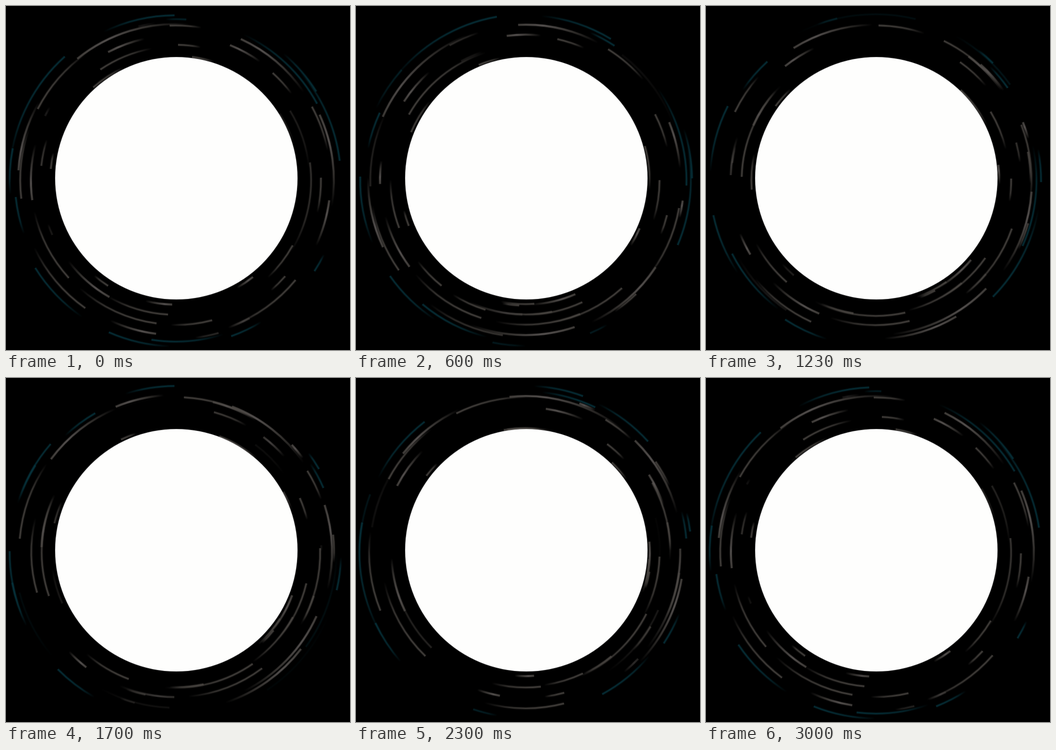
Write an HTML page with a canvas that moves like this. It is 720 px wide and 720 px high and loops after 3030 ms.

```html
<!DOCTYPE html>
<html lang="en">
<head>
<meta charset="utf-8">
<title>Orbiting light streaks</title>
<style>
  html, body { margin: 0; width: 100%; height: 100%; overflow: hidden; background: #000; }
  canvas { display: block; }
</style>
</head>
<body>
<canvas id="stage" width="720" height="720"></canvas>
<script>
const ctx = document.getElementById('stage').getContext('2d');
const LOOP = 3.03, STEPS = 91, TAU = 2 * Math.PI, RAD = Math.PI / 180;
const CX = 355, CY = 365;
const GRAY = '76,72,68', PALE = '104,99,97', TEAL = '6,52,62';

let seed = 29;
const random = () => (seed = (seed * 16807) % 2147483647) / 2147483647;
const between = (a, b) => a + (b - a) * random();

const streaks = [];

// Spread streaks around one ring; dir is -1 for counterclockwise, 1 for clockwise.
function addRing(radius, spread, count, dir, speed) {
  for (let i = 0; i < count; i++) {
    const phase = random();
    const rate = speed + between(-4, 4);
    const head = (i + between(-0.35, 0.35)) * 360 / count;
    streaks.push({
      dir,
      r: radius + between(-spread, spread),
      start: head - dir * rate * LOOP * phase,
      travel: dir * rate * LOOP,
      length: 6 + 38 * Math.pow(random(), 1.2),
      rgb: dir > 0 ? TEAL : GRAY,
      pale: dir < 0 && random() < 0.3,
      phase
    });
  }
}

for (let ring = 0; ring < 4; ring++) addRing(260.5 + 21.7 * ring, 2, 8 + ring, -1, 46);
addRing(330, 2, 4, -1, 46);
addRing(347, 1.5, 9, 1, 42);
addRing(338, 2, 4, 1, 42);

const clamp = x => Math.max(0, Math.min(1, x));

function drawStreak(s, t) {
  const age = (t / LOOP + s.phase) % 1;
  const alpha = clamp(age * 10) * clamp((1 - age) * 8);
  const sway = s.dir > 0 ? 7 * Math.sin(TAU * t / LOOP) : 0;
  const head = (s.start + s.travel * age + sway) * RAD;
  const span = Math.min(s.length, Math.abs(s.travel) * age) * RAD;
  if (alpha * span < 0.002) return;

  // The trail fades from the leading tip backwards.
  const from = s.dir > 0 ? head - span : head;
  const pad = 0.01;
  const fill = ctx.createConicGradient(from - pad, CX, CY);
  const stop = (pos, rgb, a) => {
    const along = s.dir > 0 ? 1 - pos : pos;
    fill.addColorStop((along * span + pad) / TAU, `rgba(${rgb},${a * alpha})`);
  };
  stop(0, s.rgb, 1);
  stop(0.3, s.pale ? PALE : s.rgb, 0.95);
  stop(0.65, s.rgb, 0.75);
  stop(1, s.rgb, 0);

  ctx.strokeStyle = fill;
  ctx.beginPath();
  ctx.arc(CX, CY, s.r, from, from + span);
  ctx.globalAlpha = 0.25;
  ctx.lineWidth = 6;
  ctx.stroke();
  ctx.globalAlpha = 0.75;
  ctx.lineWidth = s.pale ? 3.6 : 3;
  ctx.stroke();
  ctx.globalAlpha = 1;
}

function drawDisc() {
  ctx.fillStyle = '#fefefd';
  ctx.strokeStyle = 'rgba(254,254,253,0.2)';
  ctx.lineWidth = 2;
  ctx.beginPath();
  ctx.arc(356.5, 360.5, 253.5, 0, TAU);
  ctx.fill();
  ctx.stroke();
}

function draw(seconds) {
  const step = Math.floor(((seconds + 0.004) % LOOP) / LOOP * STEPS);
  const t = step / STEPS * LOOP;
  ctx.globalCompositeOperation = 'source-over';
  ctx.fillStyle = '#000';
  ctx.fillRect(0, 0, 720, 720);
  ctx.globalCompositeOperation = 'lighten';
  for (const s of streaks) drawStreak(s, t);
  ctx.globalCompositeOperation = 'source-over';
  drawDisc();
}

const begin = performance.now();
function tick() {
  draw((performance.now() - begin) / 1000);
  requestAnimationFrame(tick);
}
tick();
</script>
</body>
</html>
```
